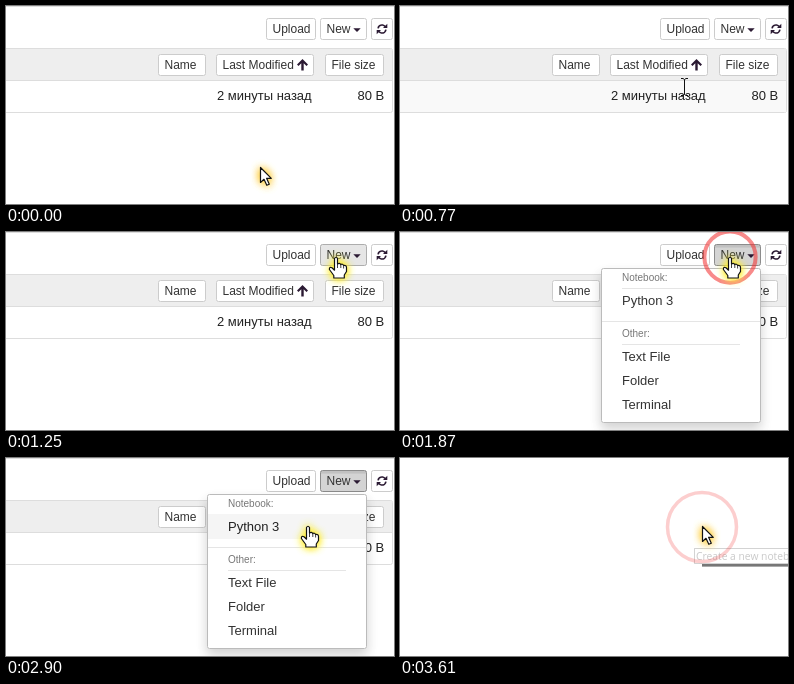
Recreate the animation shown at these times as an HTML page with a canvas. Size 388 px wide and 198 px high, loop 3690 ms.

```html
<!DOCTYPE html>
<html lang="en">
<head>
<meta charset="utf-8">
<title>Notebook menu</title>
<style>
html, body { margin: 0; width: 100%; height: 100%; overflow: hidden; background: #fff; }
canvas { display: block; }
</style>
</head>
<body>
<canvas id="stage" width="388" height="198"></canvas>
<script>
const ctx = document.getElementById('stage').getContext('2d');
const LOOP = 3690, STEP = 80;
const MOTION_STARTS = [0, 450, 1790, 2340, 3210];
const CLICK = 1790, OPEN = 1870, LEAVE = 2340, TOOLTIP = 3210, PICK = 3450, BLANK = 3610;
const SANS = '"Liberation Sans", Arial, sans-serif';
const ICON = '#2b1a33';

function fill(color, x, y, w, h) {
  ctx.fillStyle = color;
  ctx.fillRect(x, y, w, h);
}

function text(str, x, y, size = 13, color = '#222', family = SANS) {
  ctx.font = `${size}px ${family}`;
  ctx.fillStyle = color;
  ctx.fillText(str, x, y);
}

function box(x, y, w, h, bg, border, radius = 2) {
  ctx.beginPath();
  ctx.roundRect(x + .5, y + .5, w - 1, h - 1, radius);
  ctx.fillStyle = bg;
  ctx.fill();
  ctx.lineWidth = 1;
  ctx.strokeStyle = border;
  ctx.stroke();
}

function button(label, x, y, w, bg = '#fff', border = '#ccc') {
  box(x, y, w, 22, bg, border);
  text(label, x + 6.5, y + 15, 12, '#333');
}

function shape(d, color) {
  ctx.fillStyle = color;
  ctx.fill(new Path2D(d));
}

function refreshIcon(x, y) {
  ctx.strokeStyle = ICON;
  ctx.lineWidth = 1.6;
  for (const a of [0, Math.PI]) {
    ctx.save();
    ctx.translate(x, y);
    ctx.rotate(a);
    ctx.beginPath();
    ctx.arc(0, 0, 4, Math.PI * 1.05, Math.PI * 1.8);
    ctx.stroke();
    shape('M5.3 -5.3V-1H1Z', ICON);
    ctx.restore();
  }
}

function drawPage(rowHover, newState) {
  fill('#ddd', 0, 0, 388, 1);
  button('Upload', 260, 12, 50);
  const [bg, border] = {
    idle: ['#fff', '#ccc'], hover: ['#e6e6e6', '#adadad'], pressed: ['#d4d4d4', '#8c8c8c']
  }[newState];
  button('New', 314, 12, 47, bg, border);
  if (newState === 'pressed') {
    fill('rgba(0,0,0,.09)', 315, 13, 45, 2);
    fill('rgba(0,0,0,.05)', 315, 15, 45, 1);
  }
  shape('M347.3 22.3H354.7L351 26Z', ICON);
  box(365, 12, 22, 22, '#fff', '#ccc');
  refreshIcon(376, 23);

  box(-5, 42, 392, 65, '#fff', '#ddd');
  fill('#eee', 0, 43, 386, 31);
  fill('#ddd', 0, 74, 386, 1);
  if (rowHover) fill('#f9f9f9', 0, 75, 386, 31);
  button('Name', 152, 48, 48);
  button('Last Modified', 210, 48, 98);
  button('File size', 319, 48, 59);
  shape('M296.5 53L302 58.5L300.5 60L297.7 57.3V64.5H295.3V57.3L292.5 60L291 58.5Z', ICON);
  text('2 минуты назад', 211, 94);
  text('80 B', 351.5, 94);
}

function drawMenu(itemHover) {
  ctx.save();
  ctx.shadowColor = 'rgba(0,0,0,.175)';
  ctx.shadowBlur = 12;
  ctx.shadowOffsetY = 6;
  box(201, 36, 160, 155, '#fff', '#fff');
  ctx.restore();
  box(201, 36, 160, 155, '#fff', '#bbb');
  fill('#e5e5e5', 222, 56, 118, 1);
  if (itemHover) fill('#f5f5f5', 202, 56, 158, 25);
  text('Notebook:', 222, 49, 10, '#777');
  text('Python 3', 222, 73, 13, itemHover ? '#222' : '#333');
  fill('#e5e5e5', 202, 89, 158, 1);
  text('Other:', 222, 105, 10, '#777');
  fill('#e5e5e5', 222, 112, 118, 1);
  ['Text File', 'Folder', 'Terminal'].forEach((s, i) => text(s, 222, 129 + i * 24, 13, '#333'));
}

function drawTooltip(alpha, shadow) {
  ctx.globalAlpha = shadow;
  fill('#aaa', 302, 106, 86, 3);
  fill('#777', 302, 106, 86, 2);
  ctx.globalAlpha = alpha;
  box(294, 90, 250, 16, '#fff', '#767676', 0);
  text('Create a new notebook with Python 3', 296, 102, 10.3, '#575757', '"Open Sans", sans-serif');
  ctx.globalAlpha = 1;
}

const ARROW = new Path2D('M.5 .5V15.5L4 12.3L6.8 18.3L9.3 17.2L6.6 11.3H11.3Z');
const HAND = new Path2D('M-1.5 1.5Q0 -1 1.5 1.5V7Q3.5 5.5 4.8 7.6Q6.5 6.4 7.6 8.5' +
  'Q10.5 7.8 10.5 10.5V14.5L8.3 18V21H-2.2V18.5L-6.6 12.5Q-6.8 9.5 -4 10.8L-1.5 13.2Z');
const KNUCKLES = new Path2D('M1.5 7V11M4.8 8V11M7.6 9V11.5');

function drawPointer(kind, x, y) {
  ctx.save();
  ctx.translate(Math.round(x), Math.round(y));
  if (kind === 'beam') {
    ctx.strokeStyle = '#111';
    ctx.lineWidth = 1;
    ctx.stroke(new Path2D('M-3 -8.5H-1L.5 -7.5L2 -8.5H4M.5 -7.5V7.5M-3 8.5H-1L.5 7.5L2 8.5H4'));
  } else {
    const path = kind === 'hand' ? HAND : ARROW;
    ctx.shadowColor = kind === 'hand' ? '#fe3' : '#fc3';
    ctx.shadowBlur = 8;
    ctx.fillStyle = '#fff';
    for (let i = 0; i < 3; i++) ctx.fill(path);
    ctx.shadowBlur = 0;
    ctx.shadowColor = 'transparent';
    ctx.strokeStyle = '#111';
    ctx.lineWidth = 1.2;
    ctx.lineJoin = 'round';
    ctx.stroke(path);
    ctx.lineWidth = .8;
    if (kind === 'hand') ctx.stroke(KNUCKLES);
  }
  ctx.restore();
}

function drawRing(age, x, y) {
  if (age < 0 || age >= 240) return;
  const k = age / 160;
  ctx.beginPath();
  ctx.arc(x, y, 12 + 32 * k - 9.5 * k * k, 0, 7);
  ctx.lineWidth = 4.5 - k;
  ctx.strokeStyle = `rgba(242,50,50,${.9 - .66 * k})`;
  ctx.stroke();
}

function ease(t, from, to) {
  const p = Math.min(1, Math.max(0, (t - from) / (to - from)));
  return p * p * (3 - 2 * p);
}

function pointerAt(t) {
  if (t < LEAVE) {
    const s = ease(t, 370, 1250), r = 1 - s;
    const bend = (a, b, c) => r * r * a + 2 * r * s * b + s * s * c;
    return [bend(254, 286, 330), bend(161, 49, 25)];
  }
  const s = ease(t, LEAVE, 2900);
  return [329 - 27 * s, 23 + 45 * s];
}

function draw(t) {
  const [x, y] = pointerAt(t);
  const open = t >= OPEN;
  const overNew = x > 314 && y < 34;
  const overItem = open && y > 57;
  const overRow = !open && y > 75 && y < 107;
  let kind = 'arrow';
  if (overNew || overItem && t < BLANK) kind = 'hand';
  else if (overRow) kind = 'beam';

  fill('#fff', 0, 0, 388, 198);
  if (t < BLANK) {
    drawPage(overRow, t >= CLICK ? 'pressed' : overNew ? 'hover' : 'idle');
    if (open) drawMenu(overItem);
  }
  if (t >= BLANK) drawTooltip(.32, 1);
  else if (t >= TOOLTIP) {
    const shown = Math.min(1, (t - TOOLTIP + STEP) / 240);
    drawTooltip(shown, shown);
  }
  drawRing(t - CLICK, 330, 25);
  drawRing(t - PICK, 302, 69);
  drawPointer(kind, x, y);
}

function capture(t) {
  const start = MOTION_STARTS.findLast(s => s <= t);
  return start + Math.floor((t - start) / STEP) * STEP;
}

const began = performance.now();
function tick() {
  draw(capture((performance.now() - began) % LOOP));
  requestAnimationFrame(tick);
}
tick();
</script>
</body>
</html>
```
